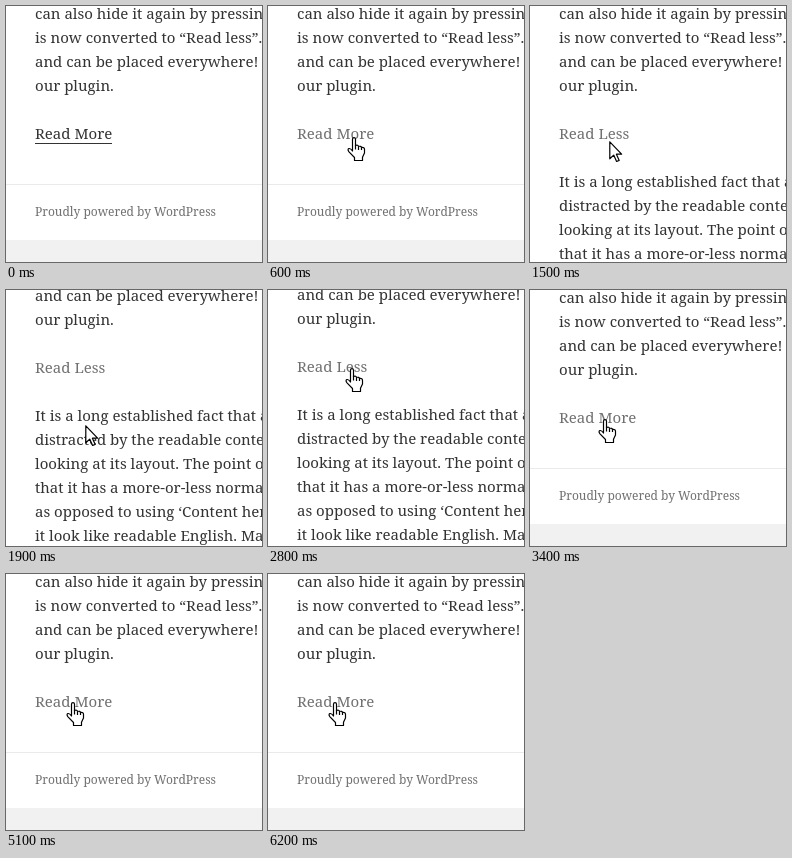
Recreate the animation shown at these times as an HTML page. Size 256 by 256 pixels, loop 7.2 s.

```html
<!DOCTYPE html>
<html lang="en">
<head>
<meta charset="utf-8">
<title>Read more toggle</title>
<style>
html, body { margin: 0; width: 100%; height: 100%; overflow: hidden; background: #fff; }

.stage {
  position: relative;
  width: 256px;
  height: 256px;
  overflow: hidden;
  background: #fff;
  color: #333;
  font: 15px/24px "Noto Serif", serif;
  /* slight lead so that changes fall safely on their tick */
  --loop: 7200ms step-end -8ms infinite;
}
.stage div, footer, footer p, svg { position: absolute; }

.page, .closed, .open { left: 0; top: 0; width: 256px; height: 256px; }
.page { animation: scroll var(--loop); }
.closed { animation: closed var(--loop); }
.open { animation: open var(--loop); }

.intro, .more, .link, footer p { left: 29px; white-space: pre; }
.intro { top: -5px; }
.link { top: 115px; }
.more { top: 163px; }
.link span { border-bottom: 1px solid #333; animation: hover var(--loop); }

footer { left: 0; top: 178px; width: 256px; height: 56px; box-sizing: border-box; border-top: 1px solid #eaeaea; }
footer p { margin: 0; top: 17px; font-size: 12px; line-height: 19px; color: #707070; }
.band { left: 0; top: 234px; width: 256px; height: 22px; background: #f1f1f1; }

.cursor { left: 0; top: 0; animation: move 7200ms linear -8ms infinite; }
svg { left: 0; top: 0; overflow: visible; fill: #fff; stroke: #000; stroke-width: 1.2; stroke-linejoin: round; }
.hand { left: -7px; animation: hand var(--loop); }
.arrow { animation: arrow var(--loop); }

@keyframes scroll {
  0% { transform: none; }
  25% { transform: translateY(-36px); }
  26.389% { transform: translateY(-50px); }
  27.778% { transform: translateY(-51px); }
  40.278%, 100% { transform: none; }
}
@keyframes hover {
  0% { color: #333; border-color: #333; }
  8.333%, 100% { color: #707070; border-color: transparent; }
}
@keyframes closed {
  0%, 40.278%, 70.833%, 100% { opacity: 1; }
  12.5%, 65.278% { opacity: 0; }
}
@keyframes open {
  0%, 40.278%, 70.833%, 100% { opacity: 0; }
  12.5%, 65.278% { opacity: 1; }
}
@keyframes hand {
  0%, 19.444%, 40.278% { opacity: 0; }
  8.333%, 36.111%, 45.833%, 100% { opacity: 1; }
}
@keyframes arrow {
  0%, 19.444%, 40.278% { opacity: 1; }
  8.333%, 36.111%, 45.833%, 100% { opacity: 0; }
}
@keyframes move {
  0% { transform: translate(262px, 256px); animation-timing-function: steps(6); }
  8.333% { transform: translate(86px, 131px); }
  16.667% { transform: translate(86px, 131px); animation-timing-function: steps(3); }
  20.833% { transform: translate(79px, 135px); }
  29.167% { transform: translate(79px, 135px); animation-timing-function: steps(5); }
  36.111% { transform: translate(84px, 78px); }
  40.278% { transform: translate(84px, 78px); animation-timing-function: steps(5); }
  47.222% { transform: translate(75px, 129px); }
  55.556% { transform: translate(75px, 129px); animation-timing-function: steps(4); }
  61.111%, 100% { transform: translate(67px, 128px); }
}
</style>
</head>
<body>
<div class="stage">
  <div class="page">
    <div class="intro">can also hide it again by pressing
is now converted to “Read less”.
and can be placed everywhere!
our plugin.</div>
    <div class="closed">
      <div class="link"><span>Read More</span></div>
      <footer><p>Proudly powered by WordPress</p></footer>
      <div class="band"></div>
    </div>
    <div class="open">
      <div class="link"><span>Read Less</span></div>
      <div class="more">It is a long established fact that a reader
distracted by the readable content of a
looking at its layout. The point of using
that it has a more-or-less normal distribution
as opposed to using ‘Content here, content
it look like readable English. Many desktop</div>
    </div>
  </div>
  <div class="cursor">
    <svg class="arrow" width="13" height="22"><path d="M.8.8v17l3.9-3.7 2.9 6.4 2.6-1.1-2.8-6.2h5.2z"/></svg>
    <svg class="hand" width="19" height="25">
      <path d="M5.5 14V2.2a1.5 1.5 0 0 1 3 0V8.5q2.6-.9 3 1 2.6-.8 3 1 3-.6 3 1.8V16l-2 4.2v3.3h-8v-3L2 14.8q-1.8-2.3-.2-3.2 1.6-.6 3.7 2.4z"/>
      <path fill="none" d="M8.5 8v4.5M11.5 9.5v3.5M14.5 10.5V13"/>
    </svg>
  </div>
</div>
</body>
</html>
```
